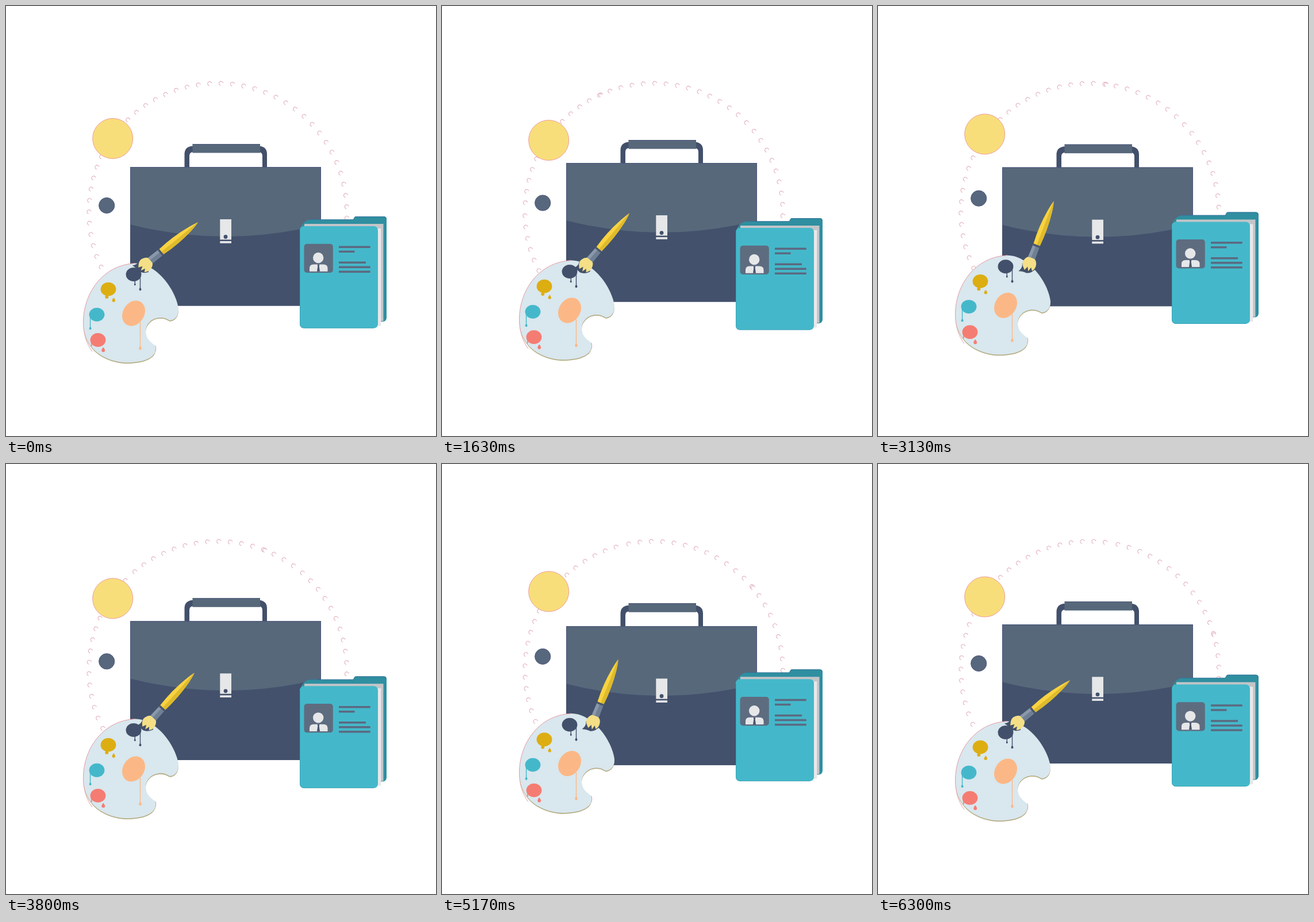
Animation, 748 px wide and 748 px high, one loop 6.33 s. Source, as an HTML page:

```html
<!DOCTYPE html>
<html lang="en">
<head>
<meta charset="utf-8">
<title>Briefcase, palette and folder</title>
<style>
  html, body { margin: 0; width: 100%; height: 100%; overflow: hidden; background: #fff; }
  svg { display: block; width: 100vw; height: 100vh; }
</style>
</head>
<body>
<svg viewBox="0 0 748 748">
  <g id="ring" fill="none" stroke="#e2b0bb" stroke-width="1.1" stroke-linecap="round"></g>

  <circle id="sun" cx="185.7" cy="230.5" r="35" fill="#f8de7a" stroke="#ee9d9d"/>
  <circle id="spot" cx="175.2" cy="347" r="13.6" fill="#57677d" stroke="#535a7c"/>

  <g id="case">
    <path d="M310.5 281V257Q311 244 326 243.5V254Q319 254 319 261V281Z" fill="#43506b"/>
    <path d="M454 281V257Q453.500 244 439 243.500V254Q446 254 446 261V281Z" fill="#43506b"/>
    <rect x="324.500" y="240" width="117.500" height="15.500" fill="#57687b"/>
    <path d="M324.500 240.500H442" stroke="#4b577a"/>
    <rect x="216" y="280" width="332" height="241.700" fill="#43516c"/>
    <path d="M216 280H548V380Q382 422 216 380Z" fill="#57687b"/>
    <path d="M216.500 380V280.500H547.500V380" fill="none" stroke="#4b567a"/>
    <rect x="372.300" y="371" width="19.700" height="41.700" fill="#e6e7e9"/>
    <path d="M372 407.700H392.300" stroke="#43516c" stroke-width="2.600"/>
    <circle cx="382" cy="401.500" r="3.400" fill="#43516c"/>
  </g>

  <g id="folder">
    <path d="M512 388Q516 374 528 371.700H604L607 367Q608 366 610 366H657Q662 366 662 371V543Q661 549 655 549H520Z" fill="#2f8fa0"/>
    <path d="M528 371.700H604L607 366.700H657Q661.500 367 661.500 371" fill="none" stroke="#35739a"/>
    <path d="M519 379H656.500V548H519Z" fill="#c3c5c8"/>
    <path d="M640 387H652.300V556.500H640Z" fill="#e8e8ea"/>
    <rect x="511" y="383" width="136" height="177.500" rx="7" fill="#44b8ca"/>
    <path d="M511.500 391V553Q512 560 518 560H640" fill="none" stroke="#3a9db2" stroke-width=".8"/>
    <rect x="518.500" y="413.700" width="50.300" height="50.300" rx="5" fill="#5e6c80"/>
    <circle cx="543.200" cy="438" r="9.200" fill="#e6e7e9"/>
    <path d="M528 461.700V456Q528 449.500 535 449.500H552Q559.500 449.500 559.500 456V461.700Z" fill="#e6e7e9"/>
    <path d="M541.500 449.500H545.500L544.700 452.500L546 461.700H541L542.300 452.500Z" fill="#4a5870"/>
    <path d="M579 419.300H633.700M579 427.300H606.500M579 446.300H626M579 454.300H633.700M579 462.300H633.700" stroke="#5c6980" stroke-width="3.500"/>
  </g>

  <g id="palette">
    <path id="board" fill="#b5ad85" transform="translate(0 1.800)" d="M134.500 550C134.500 500 168 450 225 447.500C262 447.500 297 495 300 528C300 540 293 546.500 285 547C279 543.500 274 541.500 266 542C251 544 243 555 243 566C243 579 253 586 260 591C261.500 597 260 605 253 610C243 618 225 620.500 207 620.300C163 617 134.500 590 134.500 550Z"/>
    <use id="face" href="#board"/>
    <path d="M150 601C140 588 134.500 570 134.500 550C134.500 500 168 450 225 447.500M260 591Q261.500 597 260 601" fill="none" stroke="#e59ca5"/>
    <g id="paints"></g>
  </g>

  <g id="brush">
    <path d="M-18 -13Q-9 -8 -3 -12L4 0L-3 13.500Q-13 10 -16 1Q-15 -6 -18 -13Z" fill="#43506b"/>
    <path d="M-8 -8Q-3 -13 3 -11.500Q13 -9 13.500 0Q13 9 4 11.500Q-3 13.500 -9 9L-4 5L-12 3L-5 -1L-12 -4Z" fill="#f4df86"/>
    <path d="M12 -6.500L36 -6V6L12 6.500Z" fill="#6f7f94"/>
    <path d="M12 -6.500L36 -6V-1L12 -1Z" fill="#8a98aa"/>
    <path d="M33 -6H36.500V6H33Z" fill="#4b576d"/>
    <path d="M36.500 -6Q68 -8.500 98 -4Q112 -2 118.500 0L36.500 1Z" fill="#fad340"/>
    <path d="M36.500 6Q68 8.500 98 4.500Q112 2.500 118.500 0L36.500 0Z" fill="#dfbb2c"/>
  </g>
</svg>
<script>
const LOOP = 6330, TICK = LOOP / 190, SWAY = LOOP / 3;
const RING = { x: 368.7, y: 359, r: 224.3, step: 5.065, speed: 0.02108 };
const $ = id => document.getElementById(id);

function add(parent, tag, attrs) {
  const el = document.createElementNS('http://www.w3.org/2000/svg', tag);
  for (const k in attrs) el.setAttribute(k, attrs[k]);
  return parent.appendChild(el);
}

// paint blobs, drips and drops
const paints = $('paints');
const blob = (x, y, fill, rx = 13.4, ry = 11.9, turn = 0) =>
  add(paints, 'ellipse', { cx: x, cy: y, rx, ry, fill, transform: `rotate(${turn} ${x} ${y})` });
const drop = (x, y, r, fill) =>
  add(paints, 'path', { fill, d: `M${x} ${y - r * 1.9}Q${x + r} ${y - r * .6} ${x + r} ${y}A${r} ${r} 0 0 1 ${x - r} ${y}Q${x - r} ${y - r * .6} ${x} ${y - r * 1.9}Z` });
function drip(x, y1, y2, r, fill) {
  add(paints, 'path', { d: `M${x} ${y1}V${y2}`, stroke: fill, 'stroke-width': 1.4 });
  drop(x, y2 - r, r, fill);
}
const NAVY = '#43506b', GOLD = '#ddae12', TEAL = '#44b8ca', CORAL = '#f57c72', PEACH = '#fbb886';
blob(222, 467, NAVY);
drip(224.3, 476, 486, 1.5, NAVY);
drip(233.5, 462, 495, 2, NAVY);
blob(178, 492.7, GOLD);
drop(175.3, 506, 3, GOLD);
drop(187.3, 512.3, 2.7, GOLD);
blob(158, 536.8, TEAL);
drip(146.6, 538, 563, 2, TEAL);
blob(160, 581, CORAL);
drop(169.2, 599, 2.9, CORAL);
drip(148.8, 584, 592, .9, CORAL);
blob(222, 534.5, PEACH, 18.5, 23.3, 32);
drip(233.5, 550, 598, 2.3, PEACH);

// the board's lit face sits above its khaki edge
const board = $('board').cloneNode();
board.removeAttribute('id');
board.removeAttribute('transform');
board.setAttribute('fill', '#d9e7ee');
$('face').replaceWith(board);

// ring dots, with one doubled dot and one wide gap
const dots = [];
function addDot(angle) {
  const el = add($('ring'), 'path', { d: 'M-1.2 3.4A3.600 3.600 0 1 1 3.400 -1.200' });
  dots.push({ el, angle });
}
for (let k = 19; k > -54; k--) {
  const angle = 1.4 + k * RING.step - (k < -24 ? .72 : 0);
  addDot(angle);
  if (k === -12) addDot(angle + .65);
}

const shift = (id, y) => $(id).setAttribute('transform', `translate(0 ${y.toFixed(2)})`);

// 0 at rest, 1 halfway; each half starts briskly and settles softly
function swing(phase) {
  const back = phase >= .5, x = (back ? phase - .5 : phase) * 2;
  const e = .6 * x + 1.8 * x * x - 1.4 * x * x * x;
  return back ? 1 - e : e;
}

function draw(t) {
  const phase = t / SWAY % 1, turn = phase * 2 * Math.PI, s = swing(phase);
  const drift = 7 * Math.cos(turn + Math.PI / 3) - 3.5;
  shift('case', 7 * Math.sin(turn));
  shift('sun', drift);
  shift('folder', drift);
  shift('palette', -13.8 * s);
  shift('spot', -12.4 * s);
  const bx = 242 + 21 * s, by = 450.3 - s + 3 * s * (1 - s);
  $('brush').setAttribute('transform', `translate(${bx} ${by}) rotate(${-38.8 - 30 * s})`);

  for (const { el, angle } of dots) {
    const a = angle + RING.speed * t, rad = a * Math.PI / 180;
    const shown = a > -126 && a < 98;
    el.setAttribute('display', shown ? 'inline' : 'none');
    if (shown) el.setAttribute('transform',
      `translate(${RING.x + RING.r * Math.sin(rad)} ${RING.y - RING.r * Math.cos(rad)})`);
  }
}

const start = performance.now();
function frame(now) {
  const t = Math.max(0, now - start) % LOOP;
  draw(Math.floor((t + 4) / TICK) * TICK % LOOP);
  requestAnimationFrame(frame);
}
draw(0);
requestAnimationFrame(frame);
</script>
</body>
</html>
```
